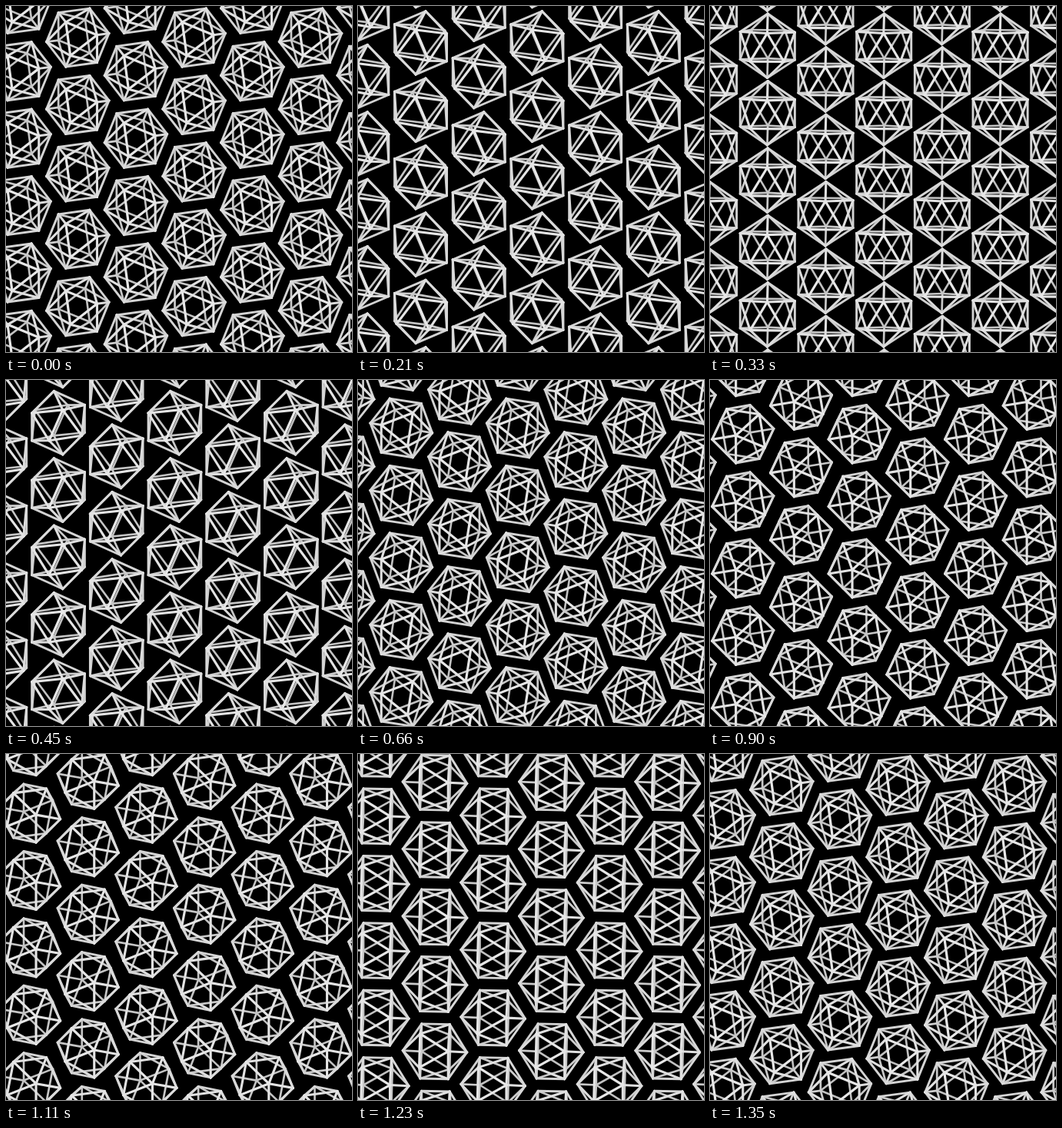
An HTML page with a canvas for the animation above (1.38 s loop, 450x450 px).

```html
<!DOCTYPE html>
<html lang="en">
<head>
<meta charset="utf-8">
<title>Icosahedra</title>
<style>
  html, body { margin: 0; width: 100%; height: 100%; overflow: hidden; background: #000; }
  canvas { display: block; }
</style>
</head>
<body>
<canvas id="stage" width="450" height="450"></canvas>
<script>
const SIZE = 450;
const STEP_MS = 30;
const STEPS = 46;
const TURN_STEPS = 45;
const RADIUS = 41.8;
const ROW = 87.4;
const COLUMN = { x: ROW * Math.sqrt(3) / 2, y: ROW / 2 };
const ORIGIN = { x: 93.3, y: 128.5 };

const ctx = document.getElementById('stage').getContext('2d');
ctx.lineCap = 'round';

const PHI = (1 + Math.sqrt(5)) / 2;
const UNIT = RADIUS / Math.hypot(1, PHI);
const SIN_TILT = Math.sqrt(1 / 3);
const COS_TILT = Math.sqrt(2 / 3);

const vertices = [];
for (const a of [-1, 1]) {
  for (const b of [-PHI, PHI]) {
    vertices.push([0, a, b], [a, b, 0], [b, 0, a]);
  }
}

const edges = [];
vertices.forEach((p, i) => vertices.forEach((q, j) => {
  const length = Math.hypot(p[0] - q[0], p[1] - q[1], p[2] - q[2]);
  if (i < j && Math.abs(length - 2) < 0.01) edges.push([i, j]);
}));

// Isometric view of a vertex for a camera at the given azimuth.
function project([x, y, z], azimuth) {
  const c = Math.cos(azimuth), s = Math.sin(azimuth);
  const toward = x * c + y * s;
  return {
    x: (y * c - x * s) * UNIT,
    y: (toward * SIN_TILT - z * COS_TILT) * UNIT,
    depth: (toward * COS_TILT + z * SIN_TILT) / PHI
  };
}

// The hexagonal lattice drifts by one column per turn.
function visibleCenters(progress) {
  const centers = [];
  const x0 = ORIGIN.x - COLUMN.x * progress;
  const y0 = ORIGIN.y + COLUMN.y * progress;
  for (let col = -2; col <= 7; col++) {
    const x = x0 + col * COLUMN.x;
    const offset = y0 + col * COLUMN.y;
    const first = Math.ceil((-50 - offset) / ROW);
    for (let y = offset + first * ROW; y < SIZE + 50; y += ROW) {
      centers.push({ x, y });
    }
  }
  return centers;
}

function draw(step) {
  const progress = (step % TURN_STEPS) / TURN_STEPS;
  const points = vertices.map(v => project(v, Math.PI * (0.75 - progress)));
  const centers = visibleCenters(progress);
  const struts = edges
    .map(([i, j]) => ({ p: points[i], q: points[j], depth: (points[i].depth + points[j].depth) / 2 }))
    .sort((a, b) => a.depth - b.depth);

  ctx.fillStyle = '#000';
  ctx.fillRect(0, 0, SIZE, SIZE);
  for (const { p, q, depth } of struts) {
    const tone = Math.round(212 + 20 * depth);
    ctx.strokeStyle = `rgb(${tone},${tone},${tone})`;
    ctx.lineWidth = 2.9 + 0.3 * depth;
    ctx.beginPath();
    for (const c of centers) {
      ctx.moveTo(c.x + p.x, c.y + p.y);
      ctx.lineTo(c.x + q.x, c.y + q.y);
    }
    ctx.stroke();
  }
}

const start = performance.now();
function tick() {
  const elapsed = Math.max(0, performance.now() - start);
  draw(Math.floor(elapsed / STEP_MS) % STEPS);
  requestAnimationFrame(tick);
}
tick();
</script>
</body>
</html>
```
